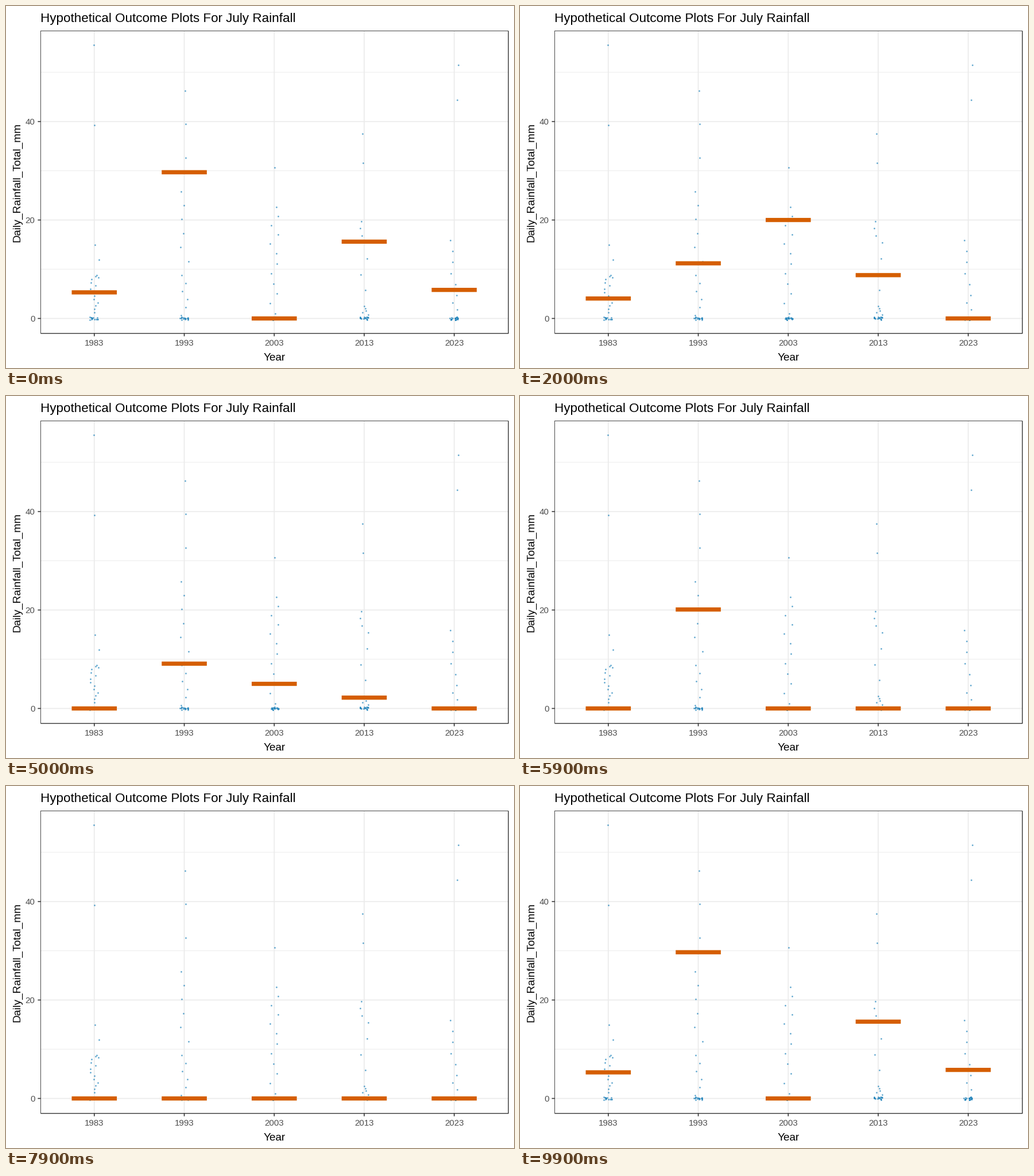
Animation of 885x632 px, one loop 10 s. Source, as a matplotlib script:

```python
import numpy as np
import matplotlib.pyplot as plt
from matplotlib.animation import FuncAnimation
from matplotlib.patches import Rectangle

W, H, DPI = 885, 632, 64
PT = 72 / DPI                      # points per pixel
LEFT, RIGHT, TOP, BOTTOM = 60.4, 875.2, 43.5, 571.6
X0, STEP = 153.8, 156.75           # first year, distance between years
Y0, MM = 545.5, 8.595              # zero line, pixels per millimetre
BAR_W, BAR_H = 78.6, 7.3
DAYS, N_DRAWS = 31, 20
INK, GREY, GRID = "#333333", "#4D4D4D", "#EBEBEB"
BLUE, ORANGE = "#0072B2", "#D55E00"

# rainfall by rank of the day (wettest first), linear between these points
RAIN = {
    1983: {0: 55.6, 1: 39.3, 2: 15, 4: 8.8, 7: 8, 17: 1.2},
    1993: {0: 46.3, 3: 25.8, 6: 17.3, 9: 8.8, 14: 0.6},
    2003: {0: 30.7, 1: 22.6, 5: 15.2, 12: 1},
    2013: {0: 37.5, 1: 31.6, 2: 19.7, 5: 15.4, 9: 2.5, 14: 0.3},
    2023: {0: 51.5, 1: 44.4, 2: 15.9, 7: 4.7, 10: 0.3},
}
# wet outcomes by draw; every other draw lands on a dry day
OUTCOMES = {
    1983: {0: 5.3, 4: 4.05, 5: 10.6, 7: 4.5, 17: 55.6},
    1993: {0: 29.7, 4: 11.2, 7: 46.4, 9: 17.4, 10: 9.1, 12: 20.1, 15: 38.7},
    2003: {4: 20, 8: 22.9, 10: 5, 11: 22.9},
    2013: {0: 15.6, 2: 19.6, 4: 8.8, 5: 8.8, 10: 2.2, 18: 13.6, 19: 37.5},
    2023: {0: 5.8, 1: 44.4, 7: 0.4, 13: 16, 18: 0.4, 19: 0.4},
}

plt.rcParams["font.family"] = "Liberation Sans"
rng = np.random.default_rng(7)

fig = plt.figure(figsize=(W / DPI, H / DPI), dpi=DPI, facecolor="white")
ax = fig.add_axes([0, 0, 1, 1])
ax.set_xlim(0, W)
ax.set_ylim(H, 0)
ax.axis("off")


def year_x(year):
    return X0 + (year - 1983) / 10 * STEP


def rain_y(mm):
    return Y0 - mm * MM


def line(xs, ys, width, color, z):
    ax.plot(xs, ys, color=color, lw=width * PT, zorder=z, snap=False,
            solid_capstyle="butt", solid_joinstyle="miter")


def label(x, y, text, size, color="black", ha="center", **kw):
    ax.text(x, y, text, fontsize=size * PT, color=color, ha=ha,
            va="baseline", **kw)


def dots(year):
    """One jittered dot per day of the month."""
    curve = RAIN[year]
    mm = np.interp(np.arange(DAYS), list(curve), list(curve.values()))
    dry = np.arange(DAYS) > max(curve)
    mm[dry] = rng.uniform(-0.3, 0.3, dry.sum())
    x = year_x(year) + rng.uniform(-7.8, 7.8, DAYS)
    ax.scatter(x, rain_y(mm), s=(2.8 * PT) ** 2, color=BLUE, alpha=0.6,
               lw=0, zorder=3)


def add_bar(year):
    return ax.add_patch(Rectangle((year_x(year) - BAR_W / 2, 0), BAR_W, BAR_H,
                                  fc=ORANGE, lw=0, zorder=4, snap=False))


for mm in (10, 30, 50):
    line([LEFT, RIGHT], [rain_y(mm)] * 2, 0.9, GRID, 1)
for mm in (0, 20, 40):
    y = rain_y(mm)
    line([LEFT, RIGHT], [y, y], 1.7, GRID, 1)
    line([LEFT - 5, LEFT], [y, y], 1.6, INK, 2)
    label(50.6, y + 5.6, str(mm), 15, GREY, "right")
for year in RAIN:
    x = year_x(year)
    line([x, x], [TOP, BOTTOM], 1.7, GRID, 1)
    line([x, x], [BOTTOM, BOTTOM + 5], 1.6, INK, 2)
    label(x, 593.4, str(year), 15, GREY)
    dots(year)

# panel border, finer on the left and top
line([LEFT, LEFT, RIGHT], [BOTTOM, TOP, TOP], 0.9, INK, 6)
line([LEFT, RIGHT, RIGHT], [BOTTOM, BOTTOM, TOP], 1.4, INK, 6)

label(60.2, 28.3, "Hypothetical Outcome Plots For July Rainfall", 22.4, ha="left")
label(467.3, 618.8, "Year", 19)
label(24.6, 307.6, "Daily_Rainfall_Total_mm", 19, rotation=90,
      rotation_mode="anchor")

bars = {year: add_bar(year) for year in RAIN}


def outcome(year, draw):
    return OUTCOMES[year].get(draw % N_DRAWS, 0)


def update(n):
    # each draw holds four ticks and slides for one; the middle one is a tick short
    draw, phase = divmod(n + (n > 50), 5)
    slide = 0.5 if phase == 4 else 0
    for year, bar in bars.items():
        mm = (1 - slide) * outcome(year, draw) + slide * outcome(year, draw + 1)
        bar.set_y(rain_y(mm) - BAR_H / 2)
    return list(bars.values())


anim = FuncAnimation(fig, update, frames=100, interval=100, repeat=True)
plt.show()
```
